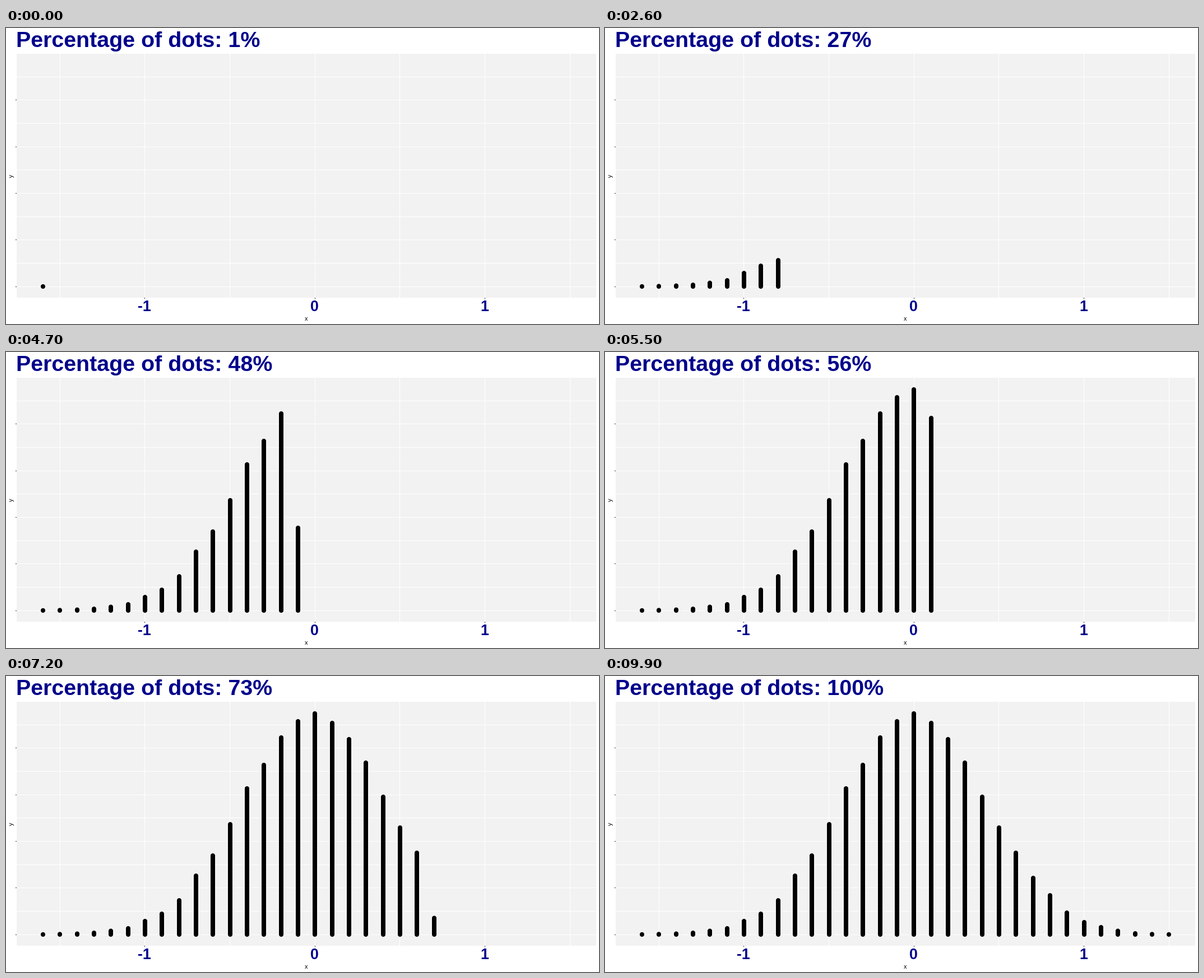
Write a matplotlib script that moves like this. It is 1058x529 px and loops after 10 s.

```python
import numpy as np
import matplotlib.pyplot as plt
from matplotlib.animation import FuncAnimation
from matplotlib.collections import LineCollection, PolyCollection
from matplotlib.patches import Rectangle

W, H, DPI = 1058, 529, 64
PT = 72 / DPI  # points per pixel
NAVY = "#00008B"
LEFT, TOP, RIGHT, BOTTOM = 19, 46, 1053, 482
X0, UNIT = 551.3, 303.3
BASE, STEP, RADIUS = 462, 41.67, 4

plt.rcParams["font.family"] = "Liberation Sans"
fig = plt.figure(figsize=(W / DPI, H / DPI), dpi=DPI, facecolor="white")
ax = fig.add_axes([0, 0, 1, 1])
ax.set(xlim=(0, W), ylim=(H, 0))
ax.axis("off")


def px(x):
    return X0 + UNIT * x


def lines(segments, color, **kw):
    ax.add_collection(LineCollection(segments, colors=color, linewidths=PT,
                                     capstyle="butt", snap=False, **kw),
                      autolim=False)


def label(x, y, text, size, color="black", **kw):
    return ax.text(x, y, text, fontsize=size * PT, color=color,
                   va="baseline", **kw)


# Panel, grid and ticks
ax.add_patch(Rectangle((LEFT, TOP), RIGHT - LEFT, BOTTOM - TOP,
                       facecolor="#F2F2F2", edgecolor="none", snap=False))
grid_x = [np.floor(px(v)) + 0.5 for v in np.arange(-1.5, 1.6, 0.5)]
grid_y = [np.floor(BASE + 0.1 - STEP * k) + 0.5 for k in range(10)]
lines([[(x, TOP), (x, BOTTOM)] for x in grid_x], "white", zorder=1.1)
lines([[(LEFT, y), (RIGHT, y)] for y in grid_y], "white", zorder=1.1)
lines([[(LEFT - 2, y), (LEFT, y)] for y in grid_y[::2]], "#333333")
lines([[(x, BOTTOM), (x, BOTTOM + 2)] for x in grid_x[1::2]], "#333333")

# Labels
for v in (-1, 0, 1):
    label(px(v) - 1, 506, str(v), 26.7, NAVY, weight="bold", ha="center")
label(536, 523, "x", 11, ha="center")
label(13, 264, "y", 11, rotation=90, rotation_mode="anchor", ha="center")
title = label(18, 34, "", 39.4, NAVY, weight="bold")

# Columns of stacked dots, from left to right
heights = np.array([
    0.2, 0.7, 1.5, 3, 6.5, 11, 24, 37, 61, 105, 141, 197, 261, 303, 352, 381,
    395, 378, 349, 307, 246, 191, 146, 101, 70, 39, 22, 13, 6.5, 2, 0.7, 0.2])
columns = np.round(px(np.arange(-16, 16) / 10))
dots = PolyCollection([], facecolors="black", edgecolors="none", snap=False,
                      zorder=3)
ax.add_collection(dots, autolim=False)

# Number of columns filled at a given percentage
PERCENT = [0, 27, 34, 39, 56, 65, 82, 100]
FILLED = [0.25, 8.77, 11, 12.55, 17.91, 20.76, 26.14, 32]

half_turn = np.linspace(0, np.pi, 25)
arc = RADIUS * np.column_stack([np.cos(half_turn), np.sin(half_turn)])


def capsule(x, height):
    """Outline of a stack of dots rising from the base line."""
    return np.vstack([arc + (x, BASE), -arc + (x, BASE - height)])


def draw(i):
    percent = i + 1
    filled = np.interp(percent, PERCENT, FILLED)
    shares = np.clip(filled - np.arange(len(heights)), 0, 1)
    dots.set_verts([capsule(x, h * s)
                    for x, h, s in zip(columns, heights, shares) if s > 0])
    title.set_text(f"Percentage of dots: {percent}%")
    return dots, title


anim = FuncAnimation(fig, draw, frames=100, interval=100, repeat=True,
                     repeat_delay=0, blit=False)
plt.show()
```
